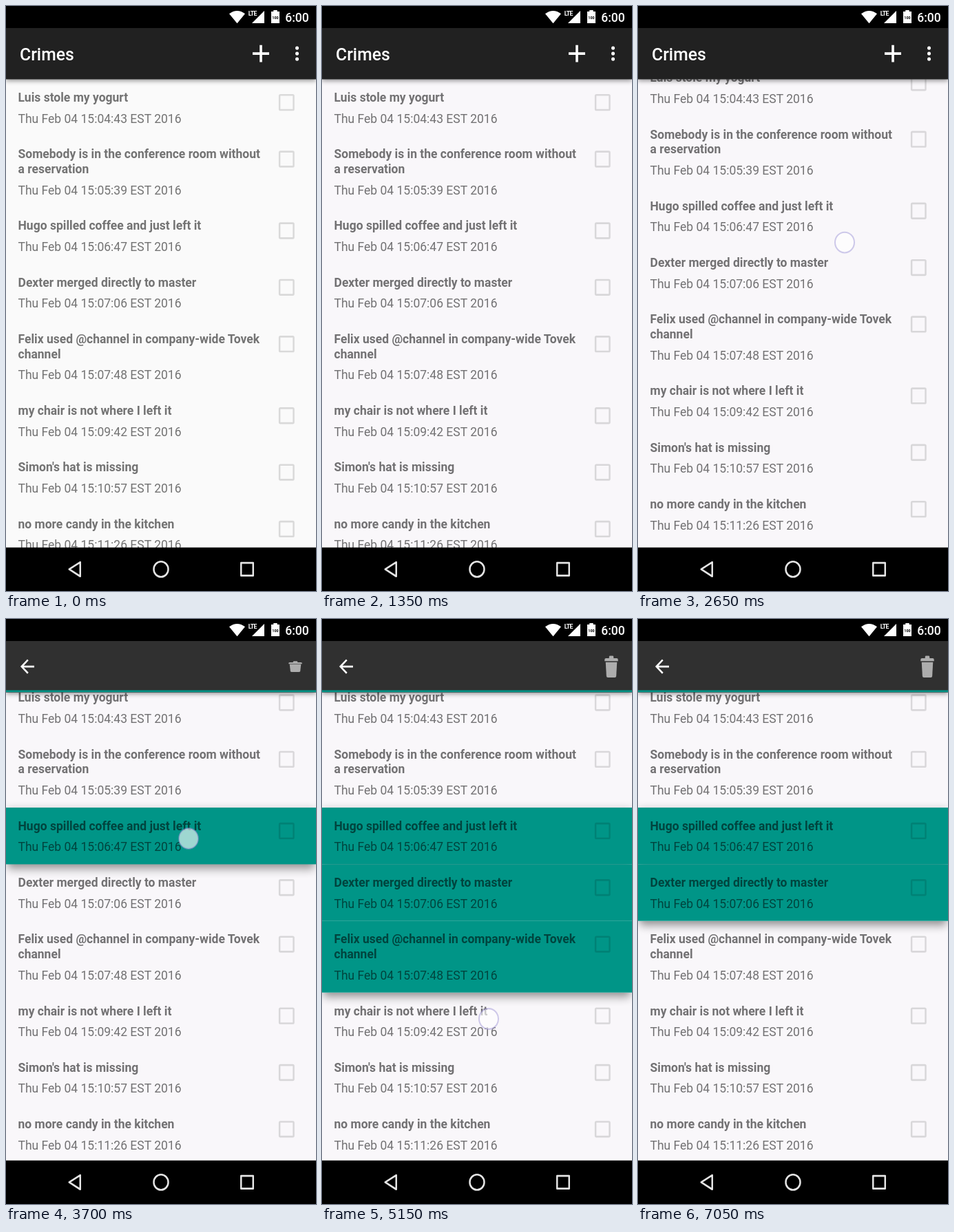
Animation, 450 px wide and 850 px high, one loop 8 s. Source, as an HTML page:

```html
<!DOCTYPE html>
<html lang="en">
<head>
<meta charset="utf-8">
<title>Crimes</title>
<style>
html, body { margin: 0; width: 100%; height: 100%; overflow: hidden; background: #000; }
/* the stage has 1080 x 1920 device pixels, shown on 450 x 850 */
#stage { position: absolute; width: 1080px; height: 1920px; transform: scale(.4166667, .4427083); transform-origin: 0 0;
  overflow: hidden; font: 42px/49px Roboto, sans-serif; }
#view { position: absolute; top: 240px; width: 1080px; height: 1540px; overflow: hidden; isolation: isolate; }
#list { position: absolute; width: 1080px; }
.row { position: absolute; width: 1080px; color: rgba(0,0,0,.54); white-space: pre; }
.row > * { position: absolute; }
.shade, .fill { inset: 0; opacity: 0; }
.shade { box-shadow: 0 27px 27px -8px rgba(0,0,0,.32), 0 0 24px rgba(0,0,0,.18); }
.fill { background: #009587; z-index: 1; }
.text { left: 42px; top: 35px; z-index: 2; }
.text b { display: block; margin-bottom: 20px; }
.box { left: 950px; top: 49px; width: 43px; height: 43px; border: 6px solid rgba(0,0,0,.13); border-radius: 6px; z-index: 2; }
svg { position: absolute; left: 0; top: 0; }
</style>
</head>
<body>
<div id="stage">
  <div id="view"><div id="list"></div></div>
  <svg width="1080" height="1920" viewBox="0 0 360 640" fill="#fff" font-family="Roboto, sans-serif">
    <circle id="glow" cx="181" r="580" fill="#212121"/>
    <rect y="24" width="360" height="56" fill="#212121" style="filter:drop-shadow(0 2px 2.5px rgba(0,0,0,.4))"/>
    <text x="16" y="59.4" font-size="19.8" font-weight="500">Crimes</text>
    <path d="M286.4 52h19.2M296 42.8v18.6" stroke="#fff" stroke-width="2.9"/>
    <circle cx="338" cy="46" r="2"/><circle cx="338" cy="52" r="2"/><circle cx="338" cy="58" r="2"/>
    <g id="mode">
      <path d="M0 24h360v56H0z" fill="#303030"/>
      <path d="M0 78h360v2H0z" fill="#009587"/>
      <path id="arrow" d="M36 51H23.8l5.6-5.6L28 44l-8 8 8 8 1.4-1.4-5.6-5.6H36z"/>
      <g id="trash" fill="#adadad">
        <path d="M333.4 43v-1.6q0-1.1 1.1-1.1h3q1.1 0 1.1 1.1V43h3.6q1.6 0 1.6 1.6v1.6h-15.6v-1.6q0-1.6 1.6-1.6z"/>
        <path d="M329.4 47.2h13.2l-.9 15.2q-.1 1.6-1.7 1.6h-8q-1.6 0-1.7-1.6z"/>
      </g>
    </g>
    <path d="M0 0h360v24H0zM0 592.4h360V640H0z" fill="#000"/>
    <path d="M268.4 19L259.2 8.4Q268.4 2 277.6 8.4zM285.6 18.8H300V5.3zM308 18.8V6h2.6V4.6h4.4V6h2.6v12.8z"/>
    <path d="M281 3.6h11v8.2h-11z" fill="#000"/>
    <text x="281.4" y="10.8" font-size="7" font-weight="700" letter-spacing="-.6">LTE</text>
    <text x="309" y="14.2" font-size="4.4" font-weight="700" fill="#000">100</text>
    <text x="324.2" y="17" font-size="14" font-weight="500">6:00</text>
    <g fill="none" stroke="#e4e4e4" stroke-width="2">
      <path d="M73.4 616.2l12.8-7.8V624zM273 609.2h14v14h-14z" stroke-linejoin="round"/>
      <circle cx="180" cy="616.2" r="8.4"/>
    </g>
    <circle id="dot" r="11.2" fill-opacity=".62" stroke="#968cd2" stroke-opacity=".45" stroke-width="1.6"/>
  </svg>
</div>
<script>
const LOOP = 8000, STEP = 50;
const $ = id => document.getElementById(id);
const set = (id, name, value) => $(id).setAttribute(name, value);
const clamp = v => Math.max(0, Math.min(1, v));
const part = (t, from, length) => clamp((t - from) / length);
const decel = p => 1 - (1 - p) ** 2;
const smooth = p => p * p * (3 - 2 * p);
const mix = (a, b, p) => a + (b - a) * p;

const items = [
  ['Luis stole my yogurt', '04:43'],
  ['Somebody is in the conference room without\na reservation', '05:39'],
  ['Hugo spilled coffee and just left it', '06:47'],
  ['Dexter merged directly to master', '07:06'],
  ['Felix used @channel in company-wide Tovek\nchannel', '07:48'],
  ['my chair is not where I left it', '09:42'],
  ["Simon's hat is missing", '10:57'],
  ['no more candy in the kitchen', '11:26'],
  ['no more printer paper', '13:11']
];

let total = 0;
const rows = items.map(([title, time]) => {
  const height = title.includes('\n') ? 235 : 186;
  const row = document.createElement('div');
  row.className = 'row';
  row.style.cssText = `top:${total}px;height:${height}px`;
  row.innerHTML = '<div class="shade"></div><div class="fill"></div>' +
    `<div class="text"><b>${title}</b>Thu Feb 04 15:${time} EST 2016</div><div class="box"></div>`;
  $('list').append(row);
  total += height;
  return row;
});
const bottom = total - 1536;

// start, end, x, y, then either the y reached, or the row toggled and when
const drags = [
  [550, 800, 256, 400, 268],
  [850, 1100, 265.6, 251.4, 374.6],
  [1400, 1600, 244, 282, 222],
  [2200, 2850, 240, 217.6, 266.3]
];
const taps = [
  [3000, 4050, 212, 240.2, 2, 3500],
  [4200, 4450, 205, 296, 3, 4300],
  [4500, 4800, 200, 365, 4, 4600],
  [5150, 5400, 193.6, 437.5, 5, 5250],
  [5400, 5650, 195, 375, 4, 5500],
  [5900, 6150, 203, 305, 3, 6000],
  [6350, 6550, 202.4, 455.5, 5, 6430],
  [6750, 7050, 203, 303, 3, 6850]
];

function scrollAt(t) {
  if (t < 850) return bottom * part(t, 550, 150);
  if (t < 1400) return Math.max(0, mix(bottom, 15, (t - 850) / 150));
  if (t < 2200) return 189 * decel(part(t, 1400, 250));
  return mix(189, 42, smooth(part(t, 2200, 600)));
}

function drawDot(t) {
  const on = ([start, end]) => t >= start && t < end;
  const drag = drags.find(on), touch = drag || taps.find(on);
  set('dot', 'opacity', touch ? clamp((touch[1] - t) / 100) : 0);
  if (!touch) return;
  const [start, end, x, y, last] = touch;
  const p = start === 2200 ? smooth(part(t, start, 600)) : part(t, start, end - start);
  set('dot', 'cx', x);
  set('dot', 'cy', drag ? mix(y, last, p) : y);
}

function drawRows(t) {
  $('view').style.background = t < 550 ? '#fafafa' : '#f9f7fa';
  $('list').style.top = -scrollAt(t) + 'px';
  rows.forEach((row, i) => {
    const level = taps.filter(tap => tap[4] === i)
      .reduce((sum, tap, n) => sum + (n % 2 ? -1 : 1) * part(t, tap[5], 100), 0);
    row.children[0].style.opacity = row.children[1].style.opacity = level;
  });
}

function drawBars(t) {
  const glow = t < 850 ? part(t, 700, 150) : (1 - part(t, 850, 500)) ** 2;
  set('glow', 'cy', 592 + 580 - 94 * glow);
  set('glow', 'opacity', .59 * glow);
  set('mode', 'opacity', part(t, 3500, 200));
  set('arrow', 'transform', `translate(${-29 * (1 - decel(part(t, 3500, 300)))})`);
  set('trash', 'transform', `translate(0 52) scale(1 ${decel(part(t, 3600, 340))}) translate(0 -52)`);
}

function frame(now) {
  const t = Math.floor(now % LOOP / STEP) * STEP;
  drawRows(t);
  drawBars(t);
  drawDot(t);
  requestAnimationFrame(frame);
}
frame(performance.now());
</script>
</body>
</html>
```
